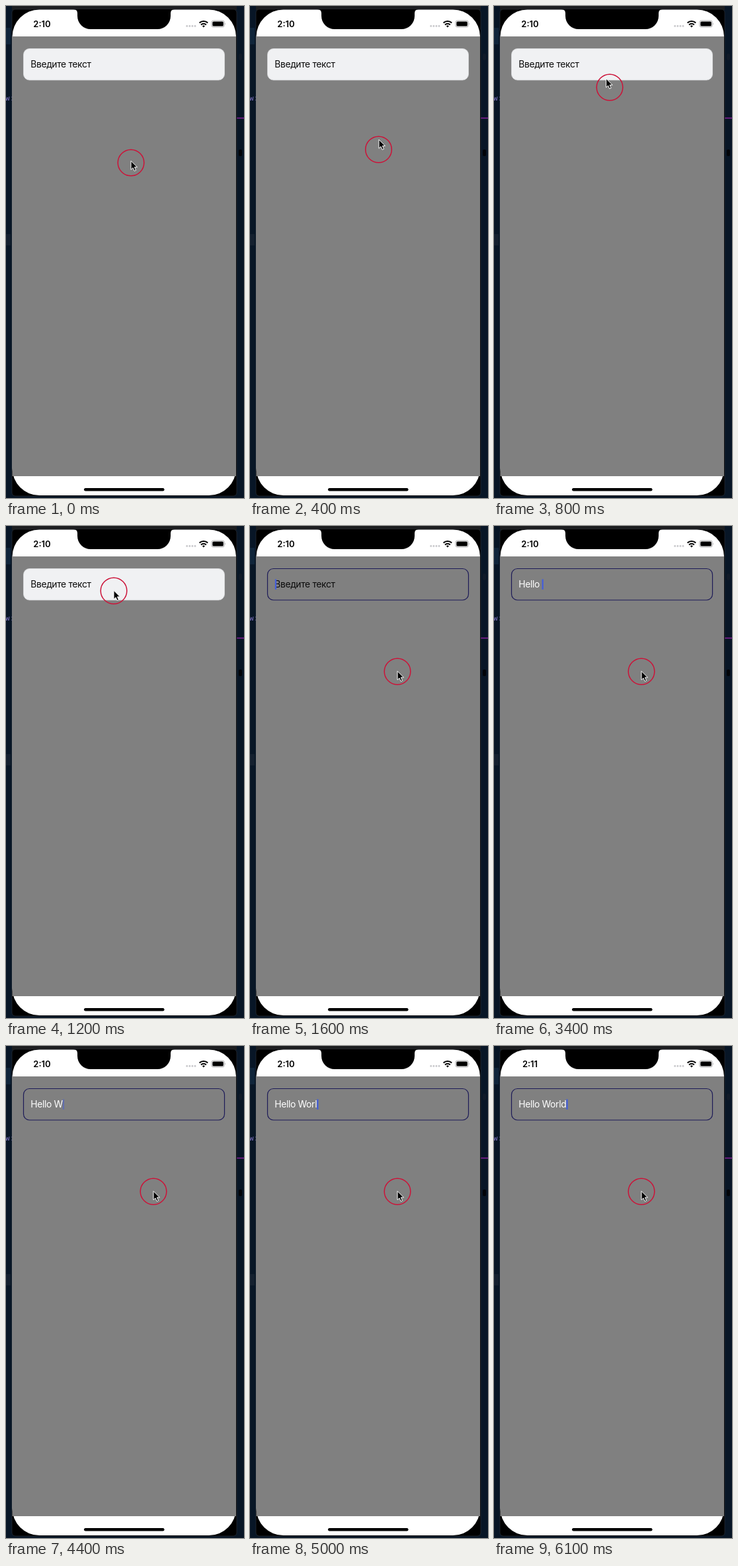
Recreate the animation shown at these times as an HTML page. Size 360 by 744 pixels, loop 6300 ms.

```html
<!DOCTYPE html>
<html lang="ru">
<head>
<meta charset="utf-8">
<style>
  html, body { margin: 0; width: 100%; height: 100%; overflow: hidden; background: #081626; }
  svg { display: block; }
  text { font-family: Inter, sans-serif; white-space: pre; }
  #entry { font-size: 13.8px; letter-spacing: -.3px; }
  #clock { font-size: 13px; font-weight: 600; text-anchor: middle; }
  #code { font: 11px "Noto Sans Mono", monospace; fill: #7a70bd; }
</style>
</head>
<body>
<svg width="360" height="744" viewBox="0 0 360 744">
  <!-- desktop behind the phone -->
  <rect width="360" height="744" fill="#081626"/>
  <rect y="33" width="7" height="25" fill="#10253a"/>
  <rect y="345" width="7" height="17" fill="#14202f"/>
  <rect x="352" y="72" width="5" height="10" rx="2" fill="#101a28"/>
  <rect x="352" y="217" width="5" height="10" rx="2" fill="#020408"/>
  <path d="M349 169.5H360" stroke="#8a1f9c" stroke-width="1.5"/>
  <text id="code" x="-1" y="143">w:</text>

  <!-- phone -->
  <rect x="9" width="340" height="6" fill="#1d1e20"/>
  <rect x="9" y="5" width="340" height="736" rx="5" fill="#000" stroke="#30343a" stroke-width=".6"/>
  <rect x="9.5" y="5.5" width="338.5" height="734.5" rx="41" fill="#fff"/>
  <rect x="9.5" y="46" width="338.5" height="665" fill="#808080"/>
  <path d="M102 5q6 0 6 6v4a20 20 0 0 0 20 20H229a20 20 0 0 0 20-20v-4q0-6 6-6z"/>
  <rect x="118" y="729" width="121.5" height="4.5" rx="2.2"/>

  <!-- status bar -->
  <text id="clock" x="54.5" y="32"></text>
  <path d="M273.7 30.3h13" stroke="#c9c9cc" stroke-width="3" stroke-linecap="round" stroke-dasharray="0 4.1"/>
  <g fill="none" stroke="#000" stroke-width="2.1">
    <path d="M292.6 25.6a8.9 8.9 0 0 1 12.6 0M295 28.4a5.6 5.6 0 0 1 7.8 0"/>
    <path d="M298.9 32.4l-2-2.1a2.9 2.9 0 0 1 4 0z" fill="#000" stroke="none"/>
  </g>
  <rect x="310.9" y="22.1" width="19.4" height="9.8" rx="2.8" fill="none" stroke="#a5a5a8" stroke-width=".9"/>
  <rect x="312.3" y="23.5" width="16.6" height="7" rx="1.6"/>
  <path d="M331.2 25.4q1.6 1.6 0 3.2z" fill="#a5a5a8"/>

  <!-- input field -->
  <rect id="field" x="26.5" y="64.5" width="304" height="47.5" rx="9"/>
  <text id="entry" x="37.2" y="93"></text>
  <rect id="caret" y="80.5" width="2.2" height="15.5" fill="#425ddc"/>

  <!-- pointer -->
  <circle id="ring" r="19.8" fill="none" stroke="#cc1238" stroke-width="1.5"/>
  <path id="arrow" d="M0 0V13.2L3 10.4L5.1 15.2L7.5 14.2L5.4 9.5H9.5Z" stroke="#fff" stroke-width="1"/>
</svg>
<script>
const LOOP = 6300, STEP = 100, FOCUS = 1400, TYPING = 2400;
const $ = id => document.getElementById(id);
const set = (id, attrs) => {
  for (const name in attrs) $(id).setAttribute(name, attrs[name]);
};

// pointer position every 100 ms
const path = [
  [189, 237], [189, 234.5], [190, 230], [192, 225], [194.5, 217], [195, 201], [190, 173], [183, 145],
  [175, 123], [169, 109], [165, 102], [163, 99], [163, 98], [163, 98], [174, 124], [207, 190], [223, 220]
];
const typed = [
  [0, 'Введите текст'], [TYPING, 'H'], [2700, 'He'], [3000, 'Hel'], [3100, 'Hell'], [3300, 'Hello'],
  [3400, 'Hello '], [3800, 'Hello W'], [4700, 'Hello Wo'], [4800, 'Hello Wor'],
  [5000, 'Hello Worl'], [5100, 'Hello World']
];
const caretAlpha = [
  [0, 0], [FOCUS, 1], [2100, .5], [2200, 0], [TYPING, 1], [4400, .5], [4500, 0],
  [4700, 1], [5700, .5], [5800, 0], [6000, .5], [6100, 1]
];
const valueAt = (keys, t) => keys.findLast(([start]) => start <= t)[1];

function pointer(t) {
  let i = Math.min(t / STEP, path.length - 1);
  if (i === 13) i = 12; // rests on the field while tapping
  const here = path[i], next = path[i + 1] || here;
  const lead = here.map((v, k) => v + .9 * (next[k] - v));
  set('ring', { cx: here[0], cy: here[1] });
  set('arrow', { transform: `translate(${lead[0]} ${lead[1] - .5})` });
}

function draw(now) {
  const t = Math.floor(now % LOOP / STEP) * STEP;
  const focused = t >= FOCUS, typing = t >= TYPING;
  pointer(t);
  $('clock').textContent = t < 5300 ? '2:10' : '2:11';
  set('field', {
    fill: focused ? 'none' : '#f0f1f3',
    stroke: focused ? '#1d1b58' : '#dcdde0',
    'stroke-width': focused ? 1.2 : .8
  });
  $('entry').textContent = valueAt(typed, t);
  set('entry', { fill: typing ? '#fff' : '#0b0b0b' });
  set('caret', {
    x: typing ? 37.2 + $('entry').getComputedTextLength() : 37.8,
    opacity: valueAt(caretAlpha, t)
  });
  requestAnimationFrame(() => draw(performance.now() - start));
}
const start = performance.now();
draw(0);
</script>
</body>
</html>
```
